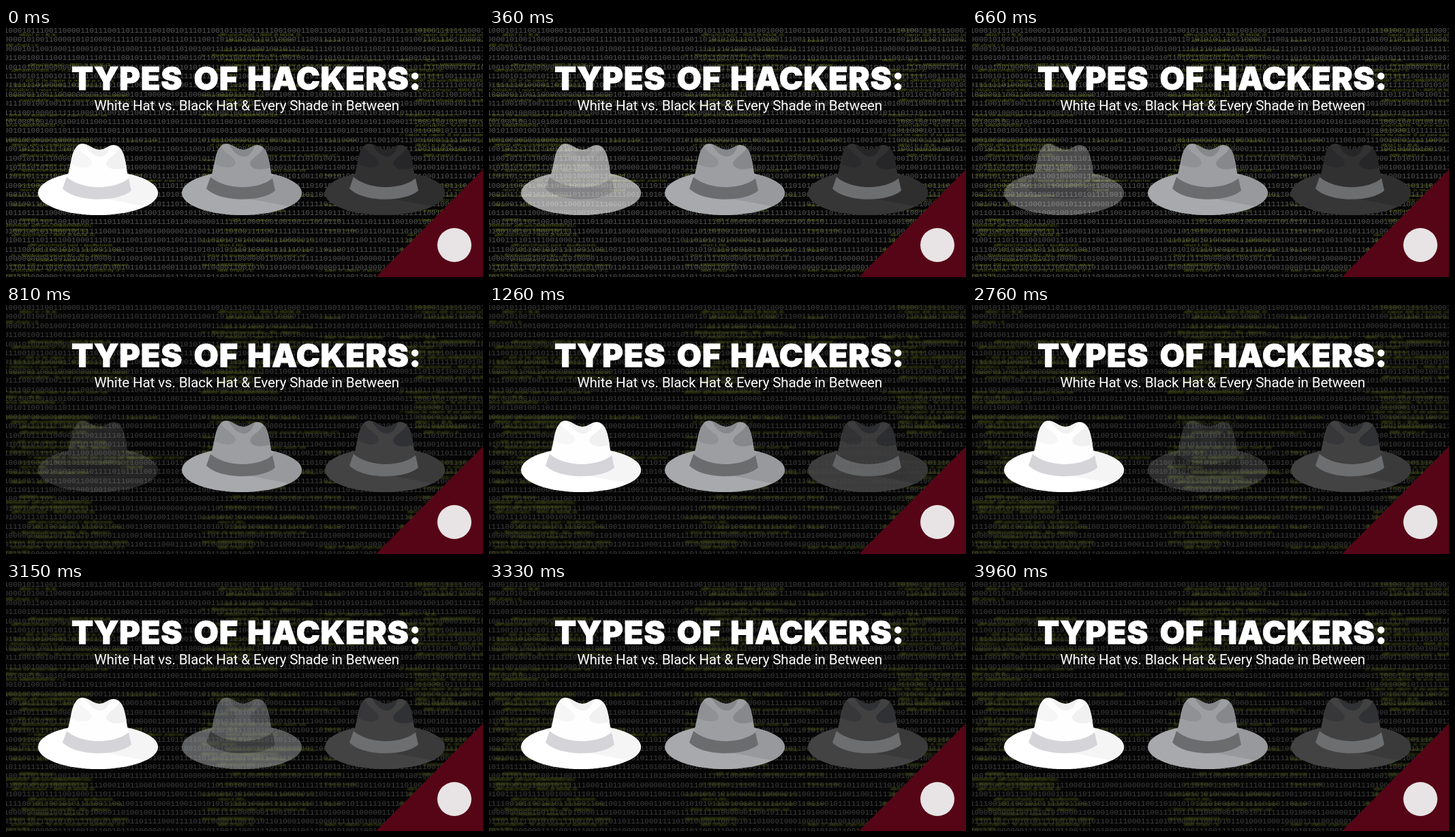
An HTML page with a canvas for the animation above (4500 ms loop, 700x366 px).

```html
<!DOCTYPE html>
<html lang="en">
<head>
<meta charset="utf-8">
<title>Types of Hackers</title>
<style>
  html, body { margin: 0; width: 100%; height: 100%; overflow: hidden; background: #050505; }
  #stage { position: relative; width: 700px; height: 366px; overflow: hidden; }
  canvas, svg { position: absolute; left: 0; top: 0; display: block; }
  .title { font: 900 47px Inter, Roboto, sans-serif; letter-spacing: .7px; fill: #fff; stroke: #fff; stroke-width: .8px; }
  .sub { font: 400 20.6px Roboto, "Open Sans", sans-serif; letter-spacing: -.15px; fill: #fff; }
  .white { --brim: #fff; --shade: #f6f5f5; --crown: #fefefe; --dent: #f1f1f2; --band: #d5d5d9; }
  .gray { --brim: #a7a9ac; --shade: #97999c; --crown: #9c9ea2; --dent: #86888b; --band: #6b6c6e; }
  .black { --brim: #434344; --shade: #3a3a3b; --crown: #414142; --dent: #303134; --band: #6d6e70; }
  .black.deep { --brim: #363637; --shade: #2e2e2f; --crown: #313132; --dent: #262628; }
  .brim { fill: var(--brim); }
  .shade { fill: var(--shade); }
  .crown { fill: var(--crown); }
  .dent { fill: var(--dent); }
  .band { fill: var(--band); }
</style>
</head>
<body>
<div id="stage">
  <canvas id="sharp" width="700" height="366"></canvas>
  <canvas id="soft" width="700" height="366"></canvas>
  <svg width="700" height="366" viewBox="0 0 700 366">
    <defs>
      <g id="hat">
        <ellipse class="brim" cx="135" cy="242.5" rx="88" ry="32.5"/>
        <path class="shade" d="M183 215.3A88 32.5 0 0 1 205 262.2L140 250Z"/>
        <path class="crown" d="M84 236C90 222 93 208 96 192C99 179 104 170 112 170C121 170 127 179 137 179C146 179 150 172 158 172C168 172 173 184 175 196C178 212 180 224 184 238C165 254 105 254 84 236Z"/>
        <path class="dent" d="M116 171C123 172 129 179 137 179C144 179 149 174 154 173C151 182 146 189 138 189C129 189 121 180 116 171Z"/>
        <path class="dent" d="M105 175C111 185 125 189 126 198C125 206 112 208 96 200L98 186C100 180 102 177 105 175Z" opacity=".55"/>
        <path class="dent" d="M167 176C162 187 149 190 147 199C148 208 163 210 177 205C175 193 173 182 167 176Z"/>
        <path class="band" d="M89 219C111 238 158 239 180 221L184 239C165 256 104 257 83 236Z"/>
      </g>
    </defs>
    <use href="#hat" class="white"/>
    <use href="#hat" class="gray" x="211"/>
    <use href="#hat" class="black" x="421"/>
    <path d="M700 208V366H543Z" fill="#560516"/>
    <circle cx="658" cy="319" r="25" fill="#e8e4e5"/>
    <g class="title">
      <text x="96" y="91">TYPES</text>
      <text x="275.5" y="91">OF</text>
      <text x="354" y="91">HACKERS:</text>
    </g>
    <text class="sub" x="129.5" y="121">White Hat vs. Black Hat &amp; Every Shade in Between</text>
  </svg>
</div>
<script>
const LOOP = 4500, STEP = 30, SOFT_AT = 750;

// Hat opacity: [time, opacity], linear between entries
const fades = {
  white: [[0, 1], [930, 0], [1170, 1]],
  black: [[1170, 1], [2040, 0], [2250, 1]],
  gray: [[2190, 1], [2940, 0], [3330, 1]]
};

const code = [
  '// Define the maximum number of property counter and',
  'HRESULT hr = MQ_OK;',
  '#define NUMBEROFPROPERTIES = 1;',
  'DWORD cPropId = 0;',
  'MQQMPROPS qmprops;',
  'MQPROPVARIANT aQMPropVar[NUMBEROFPROPERTIES];',
  'QMPROPID aQMPropId[NUMBEROFPROPERTIES];',
  'aQMPropId[cPropId] = PROPID_QM_MACHINE_ID;',
  'aQMPropVar[cPropId].vt = VT_CLSID;',
  'aQMPropVar[cPropId].puuid = &guidMachineId;',
  '// GUID of the computer is returned as a string',
  'hr = MQGetMachineProperties(NULL, NULL, &qmprops);',
  'if (FAILED(hr)) { return hr; }',
  '// Computer GUID is translated into a string and then combined',
  'printf(szBuffer, "An error occurred in GuidToString \\n");',
  'return E_FAIL;',
  '// Combine the computer ID and queue number.'
];
const notes = ['// Number of computer properties', '// Property counter', '// Required'];

function random(seed) {
  return () => (seed = (seed * 1664525 + 1013904223) % 4294967296) / 4294967296;
}

function drawDigits(ctx, color) {
  const rnd = random(7);
  ctx.font = '11px "Liberation Mono", monospace';
  ctx.fillStyle = color;
  for (let y = 7; y < 380; y += 13.4) {
    let row = '';
    for (let i = 0; i < 110; i++) row += rnd() < .54 ? 1 : 0;
    ctx.fillText(row, -3, y);
  }
}

function drawCode(ctx, color) {
  const rnd = random(23);
  ctx.font = 'italic 4.9px "Liberation Mono", monospace';
  ctx.fillStyle = color;
  [-4, 287, 577].forEach((x, col) => {
    for (let k = 0; k < 50; k++) {
      const y = 5 + k * 7.35;
      const gap = rnd(), indent = rnd(), note = rnd();
      if (gap < .27) continue;
      ctx.fillText(code[(k + col * 6) % code.length], x + Math.floor(indent * 4) * 12, y);
      if (note < .22) ctx.fillText(notes[k % 3], x + 172, y);
    }
  });
}

function paint(id, digits, green, blur) {
  const ctx = document.getElementById(id).getContext('2d');
  ctx.fillStyle = '#050505';
  ctx.fillRect(0, 0, 700, 366);
  drawDigits(ctx, digits);
  ctx.filter = blur ? `blur(${blur}px)` : 'none';
  drawCode(ctx, green);
  if (blur) drawCode(ctx, green);
}

function level(keys, t) {
  if (t <= keys[0][0]) return keys[0][1];
  for (let i = 1; i < keys.length; i++) {
    const [t0, a] = keys[i - 1], [t1, b] = keys[i];
    if (t < t1) return a + (b - a) * (t - t0) / (t1 - t0);
  }
  return keys[keys.length - 1][1];
}

paint('sharp', '#555555', '#66751f', 0);
paint('soft', '#3d3d3d', '#465119', .8);

const soft = document.getElementById('soft');
const hats = Object.keys(fades).map(name => [document.querySelector('.' + name), fades[name]]);
const black = document.querySelector('.black');
const start = performance.now();

function frame() {
  const t = Math.floor((performance.now() - start) % LOOP / STEP) * STEP;
  for (const [hat, keys] of hats) hat.style.opacity = level(keys, t);
  soft.style.visibility = t < SOFT_AT ? 'hidden' : 'visible';
  black.classList.toggle('deep', t < SOFT_AT);
  requestAnimationFrame(frame);
}
frame();
</script>
</body>
</html>
```
